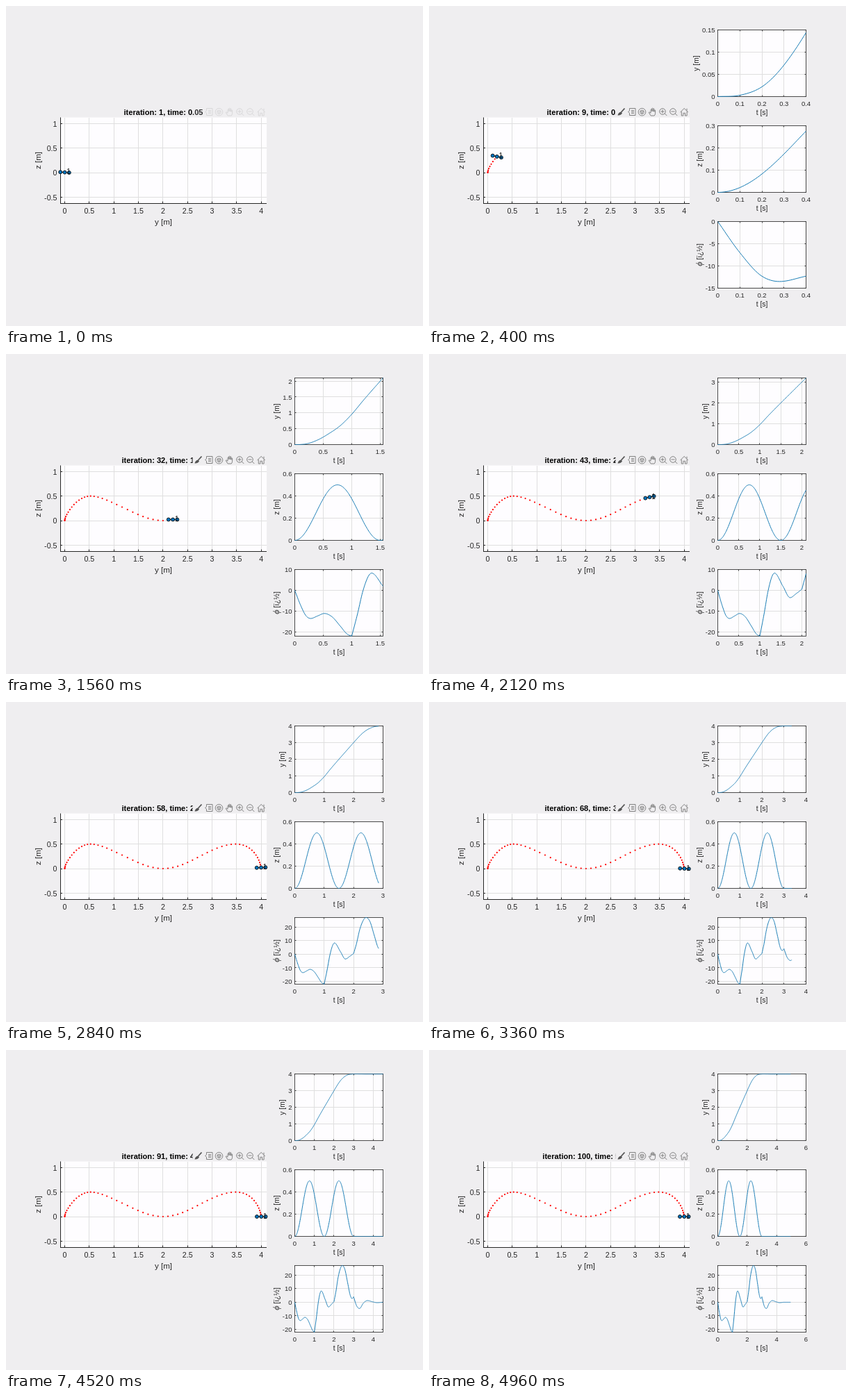
Animation of 600 by 461 pixels, one loop 5 s. Source, as an HTML page:

```html
<!DOCTYPE html>
<html lang="en">
<head>
<meta charset="utf-8">
<title>Flight path</title>
<style>
  html, body { margin: 0; width: 100%; height: 100%; overflow: hidden; background: #efeef0; }
  svg { display: block; width: 600px; height: 461px; font-family: "Liberation Sans", Arial, sans-serif; }
</style>
</head>
<body>
<svg id="stage" viewBox="0 0 600 461">
  <rect width="600" height="461" fill="#efeef0"/>
  <g id="main"></g>
  <g id="bar" fill="none" stroke="#777" stroke-width=".9">
    <rect x="268.5" y="145" width="107" height="15" fill="#efeef0" stroke="none"/>
    <g id="brush">
      <path d="M281.5 147.5L276.5 153" stroke="#555" stroke-width="1.8"/>
      <path d="M276.5 152.5q-4 .5-5 5q4.5 .5 6.5-3z" fill="#555" stroke="none"/>
    </g>
    <path d="M288.5 147.5h8.5v10h-8.5v-3.3l-2-1.700l2-1.700zM291 150.500h4M291 152.500h4M291 154.500h4"/>
    <circle cx="306.5" cy="152.700" r="5.300"/>
    <path d="M304 151.300l2.500-1.300l2.500 1.300v3l-2.500 1.400l-2.500-1.400zl2.500 1.300l2.500-1.300M306.500 152.600v3"/>
    <path d="M319.200 158l-3-4.500q.5-1.300 2 0l.8.8v-5q.8-1.200 1.600 0v2.500v-4q.9-1.200 1.700 0v4v-3.500q.9-1.200 1.700 0v4v-2q.9-1 1.600 0v4.200q0 2-1.400 3.500z"/>
    <path d="M339.300 155l3 3M333.500 152h5M336 149.500v5"/>
    <circle cx="336" cy="152" r="4.300"/>
    <path d="M354.300 155l3 3M348.500 152h5"/>
    <circle cx="351" cy="152" r="4.300"/>
    <path d="M361.500 153l5.700-5.500l5.700 5.500M363.300 152v6h2.600v-3.700h2.600v3.700h2.600v-6M371 150.700v-3"/>
  </g>
  <g id="subs"></g>
</svg>
<script>
const INK = '#262626', GRID = '#dfdfdf', BLUE = '#0072bd';
const LOOP = 5000, TICK = 40, STEP = 50, DT = 0.05, FINE = 0.01;
const $ = id => document.getElementById(id);

// Knots as [time, value]; a doubled time makes a corner.
const yKnots = [[0, 0], [.1, .003], [.2, .022], [.4, .144], [.6, .347], [.8, .598], [1, .955],
  [1.2, 1.385], [1.5, 2], [1.75, 2.5], [2, 3], [2.15, 3.295], [2.3, 3.56], [2.5, 3.81],
  [2.7, 3.95], [2.85, 3.99], [3, 4.003], [3.3, 4.004], [3.7, 4], [5, 4]];
const phiKnots = [[0, 0], [.1, -7], [.2, -12.3], [.28, -13.5], [.4, -12.3], [.52, -11.1],
  [.65, -12.6], [.8, -17.2], [.92, -21], [1, -22], [1, -22], [1.1, -11.5], [1.2, 0], [1.35, 8.3],
  [1.55, 2], [1.72, -3.5], [1.87, -1.5], [2, .5], [2, .5], [2.1, 8], [2.2, 17.5], [2.3, 23.7],
  [2.42, 27], [2.55, 24.3], [2.7, 14], [2.83, 5], [2.92, 2.7], [3, 4], [3, 4], [3.15, -2.5],
  [3.3, -4.6], [3.5, -.6], [3.7, 1.2], [4, .2], [4.2, -.3], [4.5, 0], [5, 0]];

function curve(knots) {
  const rise = i => {
    const [a, b] = [knots[i], knots[i + 1]];
    return a && b && b[0] > a[0] ? (b[1] - a[1]) / (b[0] - a[0]) : null;
  };
  const slope = i => {
    const l = rise(i - 1), r = rise(i);
    if (l === null) return r || 0;
    if (r === null) return l;
    if (l * r <= 0) return 0;
    const u = knots[i][0] - knots[i - 1][0], v = knots[i + 1][0] - knots[i][0];
    return (l * v + r * u) / (u + v);
  };
  return t => {
    let i = 0;
    while (i < knots.length - 2 && knots[i + 1][0] <= t) i++;
    const [t0, a] = knots[i], [t1, b] = knots[i + 1];
    const h = t1 - t0, s = Math.min(1, (t - t0) / h), q = 1 - s;
    return a * q * q * (1 + 2 * s) + b * s * s * (3 - 2 * s)
      + h * s * q * (slope(i) * q - slope(i + 1) * s);
  };
}

const yAt = curve(yKnots), phiAt = curve(phiKnots);
const zAt = t => t < 3 ? 0.25 * (1 - Math.cos(2 * Math.PI * t / 1.5)) : 0;

const line = (x1, y1, x2, y2, c, w = 1) =>
  `<line x1="${x1}" y1="${y1}" x2="${x2}" y2="${y2}" stroke="${c}" stroke-width="${w}"/>`;
const text = (x, y, s, size, more = '') =>
  `<text x="${x}" y="${y}" font-size="${size}" fill="${INK}" text-anchor="middle" ${more}>${s}</text>`;
const upright = (x, y, s, size) => text(0, 0, s, size, `transform="translate(${x} ${y}) rotate(-90)"`);
const crisp = v => Math.floor(v) + 0.5;
const num = v => String(+v.toPrecision(5));

// Axis limits: round outwards to ticks unless that leaves too much room.
function scale(min, max) {
  const span = max - min || 1, eps = span * 1e-6, room = 0.22 * span;
  const steps = [];
  for (let e = Math.floor(Math.log10(span)) - 1; steps.length < 9; e++)
    for (const m of [1, 2, 5]) steps.push(m * 10 ** e);
  const ticks = (lo, hi, s) => {
    const out = [];
    for (let i = Math.ceil((lo - eps) / s); i * s <= hi + eps; i++) out.push(i * s);
    return out;
  };
  const down = s => Math.floor((min + eps) / s) * s;
  const up = s => Math.ceil((max - eps) / s) * s;
  const fit = (lo, hi, s) => {
    const t = ticks(lo, hi, s);
    return t.length >= 3 && t.length <= 5 ? { lo, hi, t } : null;
  };
  for (const s of steps) {
    const lo = down(s), hi = up(s);
    if (min - lo + hi - max <= room) {
      const r = fit(lo, hi, s);
      if (r) return r;
    }
  }
  for (const s of steps) {
    const lo = min - down(s) <= room ? down(s) : min;
    const hi = up(s) - max <= room ? up(s) : max;
    const r = fit(lo, hi, s) || fit(min, max, s);
    if (r) return r;
  }
}

const plots = [
  { top: 34.5, at: yAt, name: 'y [m]' },
  { top: 172.5, at: zAt, name: 'z [m]' },
  { top: 310.5, at: phiAt, name: '<tspan font-family="Liberation Serif, serif" font-style="italic" font-size="12">ϕ</tspan> [ï¿½]' }
];

function subplot({ top, at, name }, end) {
  const L = 415.5, W = 127, H = 96, B = top + H, R = L + W, EDGE = '#3c3c3c';
  const pts = [];
  for (let i = 0; i <= Math.round(end / FINE); i++) pts.push([i * FINE, at(i * FINE)]);
  const vals = pts.map(p => p[1]);
  const xs = scale(0, end), ys = scale(Math.min(...vals), Math.max(...vals));
  const px = t => L + t / xs.hi * W;
  const py = v => B - (v - ys.lo) / (ys.hi - ys.lo) * H;
  const big = Math.max(Math.abs(ys.lo), Math.abs(ys.hi));
  const exp = big < 0.01 ? Math.floor(Math.log10(big)) : 0;
  let grid = '', marks = '', labels = '', wide = 0;
  for (const t of xs.t) {
    const x = crisp(px(t));
    grid += line(x, top, x, B, GRID);
    marks += line(x, B, x, B - 2, EDGE) + line(x, top, x, top + 2, EDGE);
    labels += text(px(t), B + 13.5, num(t), 9.5);
  }
  for (const v of ys.t) {
    const y = crisp(py(v)), s = num(v / 10 ** exp);
    grid += line(L, y, R, y, GRID);
    marks += line(L, y, L + 2, y, EDGE) + line(R, y, R - 2, y, EDGE);
    labels += `<text x="411.5" y="${py(v) + 3.6}" font-size="9.5" fill="${INK}" text-anchor="end">${s}</text>`;
    const w = [...s].reduce((n, c) => n + (c === '.' ? .278 : c === '-' ? .333 : .556), 0) * 9.5;
    wide = Math.max(wide, w);
  }
  if (exp) labels += `<text x="${L}" y="${top - 4}" font-size="9.5" fill="${INK}">×10<tspan dy="-4" font-size="7.5">${exp}</tspan></text>`;
  const d = pts.map(([t, v]) => px(t).toFixed(2) + ',' + py(v).toFixed(2)).join(' ');
  const box = fill => `<rect x="${L}" y="${top}" width="${W}" height="${H}" ${fill}/>`;
  return box('fill="#fefdff"') + grid + box(`fill="none" stroke="${EDGE}" stroke-width=".9"`) + marks
    + `<polyline points="${d}" fill="none" stroke="#1a7db5" stroke-width="1"/>` + labels
    + text(L + W / 2, B + 26.5, 't [s]', 10.3)
    + upright(406.6 - wide, top + H / 2, name, 10.3);
}

const X = y => 84.5 + 70.7 * y, Z = z => 240 - 70.6 * z;

function mainAxes() {
  let grid = '', marks = '', labels = '';
  for (let v = 0; v <= 4; v += .5) {
    const x = crisp(X(v));
    grid += line(x, 161, x, 284, GRID);
    marks += line(x, 284.5, x, 281.5, INK);
    labels += text(X(v), 299, num(v), 10.7);
  }
  for (let v = -.5; v <= 1; v += .5) {
    const y = crisp(Z(v));
    grid += line(78, y, 375, y, GRID);
    marks += line(78, y, 81, y, INK);
    labels += `<text x="73.5" y="${Z(v) + 4.4}" font-size="10.7" fill="${INK}" text-anchor="end">${num(v)}</text>`;
  }
  return '<rect x="78" y="160.5" width="297" height="124" fill="#fefdff"/>' + grid
    + line(78.5, 160.5, 78.5, 285, INK) + line(78, 284.5, 375, 284.5, INK) + marks + labels
    + text(226.5, 314.5, 'y [m]', 11.6) + upright(50.3, 222.5, 'z [m]', 11.6);
}
const axes = mainAxes();

function craft(t) {
  const cx = X(yAt(t)), cy = Z(zAt(t)), a = phiAt(t) * Math.PI / 180;
  const dx = 6.3 * Math.cos(a), dy = -6.3 * Math.sin(a);
  let out = line(cx - dx, cy - dy, cx + dx, cy + dy, '#111', 1.2);
  for (const s of [-1, 0, 1])
    out += `<circle cx="${cx + s * dx}" cy="${cy + s * dy}" r="2.5" fill="${BLUE}" stroke="#111" stroke-width=".9"/>`;
  return out + `<text x="${cx + 2.8}" y="${cy + 2.6}" font-size="10" fill="#111">1</text>`;
}

function draw(k) {
  let trail = '';
  for (let i = 0; i < k && k > 1; i++)
    trail += `<circle cx="${X(yAt(i * DT)).toFixed(2)}" cy="${Z(zAt(i * DT)).toFixed(2)}" r="1.1" fill="#f00"/>`;
  const title = `iteration: ${k}, time: ${(k * DT).toFixed(2)}`;
  $('main').innerHTML = axes + trail + craft(k * DT)
    + text(226.5, 156.5, title, 11.1, 'font-weight="bold" style="fill:#000"');
  $('bar').setAttribute('opacity', k > 1 ? 1 : 0.2);
  $('brush').setAttribute('opacity', k > 1 ? 1 : 0);
  $('subs').innerHTML = k > 1 ? plots.map(p => subplot(p, (k - 1) * DT)).join('') : '';
}

let shown = 0;
const start = performance.now();
function frame() {
  const slot = Math.floor((performance.now() - start) % LOOP / TICK);
  const k = Math.ceil((slot + .5) * TICK / STEP);
  if (k !== shown) draw(shown = k);
  requestAnimationFrame(frame);
}
frame();
</script>
</body>
</html>
```
